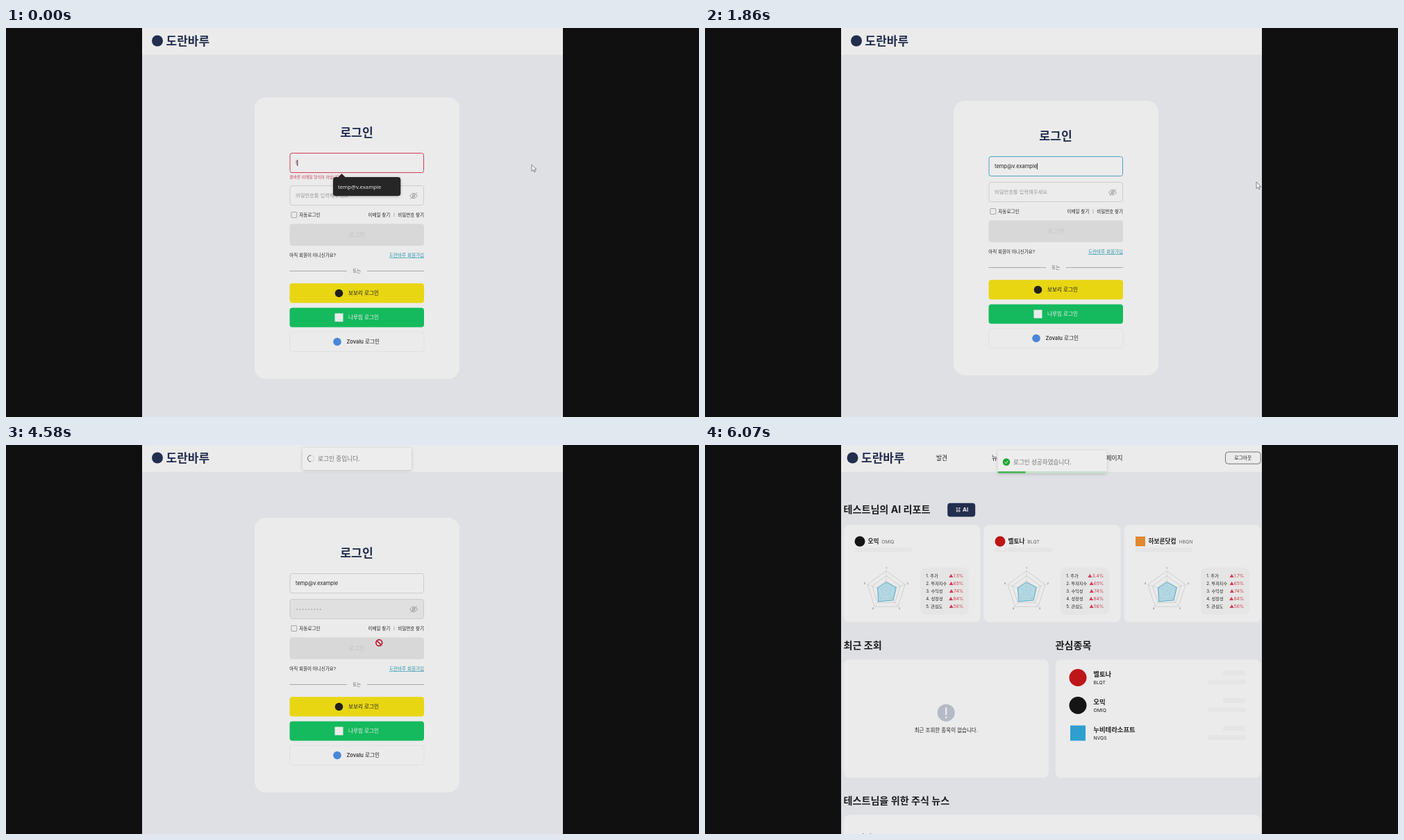
Write an HTML page that moves like this. It is 998x561 px and loops after 6.14 s.

```html
<!DOCTYPE html>
<html lang="ko">
<head>
<meta charset="utf-8">
<style>
html, body { margin: 0; width: 100%; height: 100%; overflow: hidden; background: #101010; }
svg { display: block; width: 998px; height: 561px; }
text { font-family: Inter, 'Noto Sans CJK KR', 'Noto Sans CJK', sans-serif; white-space: pre; }
.sys { font-family: 'Noto Sans', 'Noto Sans CJK KR', 'Noto Sans CJK', sans-serif; }
</style>
</head>
<body>
<svg id="stage" viewBox="0 0 998 561" xmlns="http://www.w3.org/2000/svg"></svg>
<script>
const LOOP = 6140;
const NAVY = '#232e4f', PAPER = '#ebebeb', INK = '#232323', RED = '#cf3f58', BLUE = '#4aa5c4';
const BRAND = '도란바루', EMAIL = 'temp@v.example';

const attrs = o => Object.entries(o).map(([k, v]) => `${k}="${v}"`).join(' ');
const rect = (x, y, width, height, rx, fill, more = {}) =>
  `<rect ${attrs({ x, y, width, height, rx, fill, ...more })}/>`;
const circle = (cx, cy, r, fill, more = {}) => `<circle ${attrs({ cx, cy, r, fill, ...more })}/>`;
const line = (x1, y1, x2, y2, stroke, more = {}) => `<line ${attrs({ x1, y1, x2, y2, stroke, ...more })}/>`;
const path = (d, more) => `<path ${attrs({ d, fill: 'none', ...more })}/>`;
const text = (x, y, size, str, fill = INK, more = {}) =>
  `<text ${attrs({ x, y, 'font-size': size, fill, ...more })}>${str}</text>`;
const group = (id, ...parts) => `<g id="${id}">${parts.join('')}</g>`;
const bold = { 'font-weight': 700 }, medium = { 'font-weight': 500 };
const middle = { 'text-anchor': 'middle' }, end = { 'text-anchor': 'end' };
const shadow = { filter: 'url(#shadow)' };

const logo = x => circle(x + 9, 18.5, 8, NAVY) +
  text(x + 21.6, 24.5, 17, BRAND, NAVY, { 'font-weight': 900 });

// Login page, in its settled layout (no error line)
const socialButton = (y, fill, icon, x, label, color, border = 'none') =>
  rect(408.5, y, 193.5, 28.2, 4, fill, { stroke: border, 'stroke-width': .6 }) + icon +
  text(x, y + 17, 7.6, label, color, medium);

const eye = path('M581.5 237q5.5-7.5 11 0q-5.5 7.5-11 0zM582.5 241.5l9.5-9', { stroke: '#9c9c9c' }) +
  circle(587, 237, 1.8, 'none', { stroke: '#9c9c9c' });

const loginPage = group('login', logo(209),
  rect(358, 105, 295, 396, 16, PAPER, { id: 'card' }),
  group('upper',
    text(505, 161.5, 17.2, '로그인', NAVY, { ...bold, ...middle }),
    rect(409, 185.5, 192.5, 28, 3, '#ececec', { id: 'emailBox' }),
    text(417, 202.2, 7.5, '', INK, { id: 'email' }),
    text(408.5, 222, 5.7, '올바른 이메일 형식이 아닙니다.', '#c9405a', { id: 'error' })),
  group('lower',
    rect(409, 222.5, 192.5, 28, 3, '#ececec', { id: 'passBox' }),
    text(417, 239.3, 7.3, '비밀번호를 입력해주세요.', '#9a9a9a', { id: 'hint' }),
    '<g id="dots"></g>', eye,
    rect(410.8, 260.5, 8, 8, 1, 'none', { stroke: '#888', 'stroke-width': .7 }),
    text(422.3, 266.7, 6.6, '자동로그인'),
    text(521.5, 266.7, 6.5, '이메일 찾기'), line(559, 261.5, 559, 267.5, '#999', { 'stroke-width': .7 }),
    text(602, 266.7, 6.5, '비밀번호 찾기', INK, end),
    rect(408.5, 277.5, 193.5, 31.5, 4, NAVY, { id: 'submit' }),
    text(505.3, 296.4, 8.5, '로그인', '#fff', { id: 'submitText', ...middle, ...medium }),
    text(408.3, 325, 6.5, '아직 회원이 아니신가요?'),
    text(602, 325, 6.55, BRAND + ' 회원가입', '#2a93ad', { ...end, 'text-decoration': 'underline' }),
    line(408.5, 345.5, 491, 345.5, '#9a9a9a', { 'stroke-width': .8 }),
    line(520, 345.5, 602, 345.5, '#9a9a9a', { 'stroke-width': .8 }),
    text(505.2, 347.8, 6.5, '또는', '#666', middle),
    socialButton(363.3, '#e8d613', circle(479.5, 377.5, 5.8, '#1f1f1f'), 493, '보보리 로그인', INK),
    socialButton(398.4, '#14ba5d', rect(473.5, 406.5, 12, 12, 0, PAPER), 493, '나루빔 로그인', '#eee'),
    socialButton(433.3, PAPER, circle(477, 447.5, 5.8, '#4a86d8'), 490.5, 'Zovalu 로그인', INK, '#d9d9d9')),
  line(0, 0, 0, 9, INK, { id: 'caret', 'stroke-width': .9 }),
  group('popup',
    '<path d="M478 215.5l5.5-5.5l5.5 5.5z" fill="#262626"/>',
    rect(471, 215, 97.3, 27.3, 4, '#262626', shadow),
    text(478, 231.5, 7.7, EMAIL, '#e2e2e2', { class: 'sys' }),
    path('M551.5 226l5 5.5m0-5.5l-5 5.5', { id: 'popupClose', stroke: '#ddd', 'stroke-width': .8 })));

// Home page
const polar = (cx, cy, r, i, n) => {
  const a = (i / n - .25) * 2 * Math.PI;
  return [cx + r * Math.cos(a), cy + r * Math.sin(a)];
};
const pentagon = (cx, cy, radii) =>
  radii.map((r, i) => polar(cx, cy, r, i, 5).map(v => v.toFixed(2)).join()).join(' ');

const RADAR_Y = 210, RADAR_R = 28.5;
const METRICS = ['주가', '투자지수', '수익성', '성장성', '관심도'];
const SCORES = [65, 74, 84, 56];

const report = (i, name, ticker, color, price, square) => {
  const x = 199.5 + i * 202, cx = x + 61.5;
  const nameEnd = x + 35 + name.length * 8.1;
  let out = rect(x, 115.3, 197, 140.2, 8, PAPER) +
    (square ? rect(x + 16.5, 132, 14, 14, 0, color) : circle(x + 23.5, 139, 7.5, color)) +
    text(x + 35, 142, 8.7, name, INK, bold) + text(nameEnd + 3.5, 141.5, 6.8, ticker, '#666') +
    rect(x + 16.5, 148, 82, 6.5, 1, '#e5e5e5') +
    rect(x + 110.5, 176.5, 70, 68.5, 8, '#e5e5e5');
  for (const k of [.25, .5, .75, 1])
    out += `<polygon points="${pentagon(cx, RADAR_Y, Array(5).fill(RADAR_R * k))}" fill="none" stroke="#bcbcbc" stroke-width=".6"/>`;
  METRICS.forEach((label, n) => {
    const [ex, ey] = polar(cx, RADAR_Y, RADAR_R, n, 5), [lx, ly] = polar(cx, RADAR_Y, 32.3, n, 5);
    const y = 190.6 + n * 11;
    out += line(cx, RADAR_Y, ex, ey, '#c4c4c4', { 'stroke-width': .5 }) +
      text(lx, ly + 1.2, 4, n + 1, '#666', middle) +
      text(x + 118.7, y, 6.2, `${n + 1}. ${label}`) +
      text(x + 172.8, y, 6.6, `▲${n ? SCORES[n - 1] : price}%`, RED, end);
  });
  return out + `<polygon class="radar" data-cx="${cx}" fill="#8fcbe0" fill-opacity=".6" stroke="#3f9fbd" stroke-width=".8"/>`;
};

const stock = (i, name, ticker, color, square) => {
  const y = 335.5 + i * 40;
  return (square ? rect(526, y - 11, 22, 22, 0, color) : circle(537, y, 12.5, color)) +
    text(559.3, y - 1.5, 9.4, name, INK, bold) + text(559.5, y + 9.8, 6.8, ticker) +
    rect(746, y - 10.5, 32, 7, 1, '#e5e5e5') + rect(724, y + 3, 54, 7, 1, '#e5e5e5');
};
const heading = (x, y, str) => text(x, y, 14.1, str, '#1d1d1d', bold);

const homePage = group('home', logo(203.5),
  text(333, 21.6, 8.7, '발견'), text(413, 21.6, 8.7, '뉴스'), text(601.5, 21.6, 8.7, '마이페이지', INK, end),
  rect(749.5, 10, 50.7, 17.2, 4, 'none', { stroke: '#555', 'stroke-width': .8 }),
  text(774.8, 21, 6.8, '로그아웃', INK, middle),
  group('loader', rect(436, 259.5, 128, 128, 16, PAPER),
    ...Array.from({ length: 8 }, (_, i) => {
      const [a, b] = polar(500.5, 323.5, 14.2, i, 8), [c, d] = polar(500.5, 323.5, 22, i, 8);
      return line(a, b, c, d, NAVY, { class: 'bar', 'stroke-width': 4.2, 'stroke-linecap': 'round' });
    })),
  group('content',
    heading(199.5, 97.5, '테스트님의 AI 리포트'),
    rect(349.2, 83.7, 40, 19.7, 4, NAVY),
    path('M361.5 91h2m2 0h2.5m-6.5 4h6.5m-5-5v7m3-7v7', { stroke: '#ddd', 'stroke-width': .9 }),
    text(371, 96.4, 8, 'AI', '#eee', bold),
    report(0, '오믹', 'OMIQ', '#151515', '1.5'),
    report(1, '벨토나', 'BLQT', '#bd1518', '3.4'),
    report(2, '하보른닷컴', 'HBQN', '#e08a2c', '1.7', true),
    heading(199.5, 293.5, '최근 조회'), heading(504.5, 293.5, '관심종목'),
    rect(199.5, 309.5, 295.5, 170.3, 8, PAPER), rect(504.8, 309.5, 295.5, 170.3, 8, PAPER),
    circle(347.2, 386.2, 12.5, '#b4bac6'),
    line(347.2, 379.5, 347.2, 388.5, PAPER, { 'stroke-width': 2.4, 'stroke-linecap': 'round' }),
    circle(347.2, 392.8, 1.4, PAPER),
    text(347.3, 414, 7.5, '최근 조회한 종목이 없습니다.', INK, middle),
    stock(0, '벨토나', 'BLQT', '#bd1518'),
    stock(1, '오믹', 'OMIQ', '#151515'),
    stock(2, '누비테라소프트', 'NVQS', '#2f9fd0', true),
    heading(199.5, 517.6, '테스트님을 위한 주식 뉴스'),
    rect(199.5, 533.5, 600.8, 60, 8, PAPER),
    text(226, 568.4, 9, '뉴스', INK, bold)));

const toasts = group('pending',
    rect(427, 4, 157, 32, 3, '#ededed', shadow),
    circle(439, 19.5, 4.6, 'none', { stroke: '#cfcfcf' }),
    path('M439 14.9a4.6 4.6 0 0 0 0 9.2', { stroke: '#6a6a6a' }),
    text(449, 23, 8.7, '로그인 중입니다.', '#757575', { class: 'sys' })) +
  group('success',
    rect(421.5, 8, 157, 33, 3, '#ededed', shadow),
    rect(421.5, 38, 157, 2.8, 1, '#c6dfca'), rect(421.5, 38, 157, 2.8, 1, '#4fb35a', { id: 'progress' }),
    circle(434, 24.5, 5.2, '#1fa52f'),
    path('M431.5 24.7l1.8 1.8l3.3-3.8', { stroke: '#fff' }),
    text(444, 27.9, 8.6, '로그인 성공하였습니다.', '#757575', { class: 'sys' }));

const pointers = group('arrow', path('M0 0V9.5L2.3 7.5L3.8 10.8L5.3 10.2L3.9 7H7Z',
    { fill: '#f4f4f4', stroke: '#444', 'stroke-width': .6 })) +
  group('blocked', circle(537.3, 285.3, 4.4, '#eee', { stroke: '#b3162c', 'stroke-width': 1.7 }),
    line(534.3, 282.3, 540.3, 288.3, '#b3162c', { 'stroke-width': 1.7 }));

const stage = document.getElementById('stage');
stage.innerHTML = `<defs><filter id="shadow" x="-10%" y="-30%" width="120%" height="170%">
  <feDropShadow dx="0" dy="1" stdDeviation="2" flood-opacity=".18"/></filter></defs>` +
  rect(0, 0, 998, 561, 0, '#101010') + rect(196, 0, 606, 561, 0, '#dfe0e4') +
  rect(196, 0, 606, 38.7, 0, PAPER) + loginPage + homePage + toasts +
  rect(802, 0, 196, 561, 0, '#101010') + pointers;

const el = Object.fromEntries([...stage.querySelectorAll('[id]')].map(n => [n.id, n]));
const bars = [...stage.querySelectorAll('.bar')], radars = [...stage.querySelectorAll('.radar')];
const set = (node, o) => { for (const k in o) node.setAttribute(k, o[k]); };
const show = (node, on) => { node.style.display = on ? '' : 'none'; };

// The screen refreshes in bursts: [first, interval, count]
const ticks = [[0, 70, 3], [270, 70, 2], [680, 70, 16], [1860, 70, 5], [2340, 70, 2], [2610, 0, 1],
  [2880, 130, 4], [3340, 0, 1], [3670, 130, 8], [4780, 130, 2], [5110, 130, 2], [5440, 70, 10]]
  .flatMap(([first, step, n]) => Array.from({ length: n }, (_, i) => first + i * step));

const keyPresses = [2340, 2410, 2610, 2880, 3010, 3140, 3270, 3340, 3340];
const mousePath = [[0, 757, 197], [70, 776, 330], [140, 788, 393], [340, 794, 222], [3340, 794, 222],
  [3670, 735, 250], [3800, 590, 292], [3930, 540, 282], [4060, 537, 285], [4780, 537, 285],
  [4910, 562, 245], [5110, 650, 95], [5240, 677, -4], [LOOP, 677, -40]];

function mouseAt(t) {
  const i = Math.max(1, mousePath.findIndex(p => p[0] >= t));
  const [t0, x0, y0] = mousePath[i - 1], [t1, x1, y1] = mousePath[i];
  const k = (t - t0) / (t1 - t0);
  return [x0 + (x1 - x0) * k, y0 + (y1 - y0) * k];
}

// cubic-bezier(.25, .1, .25, 1)
function ease(x) {
  const curve = (a, b, s) => 3 * a * s * (1 - s) ** 2 + 3 * b * s * s * (1 - s) + s ** 3;
  let lo = 0, hi = 1;
  for (let i = 0; i < 20; i++) {
    const mid = (lo + hi) / 2;
    if (curve(.25, .25, mid) < x) lo = mid; else hi = mid;
  }
  return curve(.1, 1, lo);
}

function drawLogin(t) {
  const filled = t >= 680, valid = t >= 1240, onPassword = t >= 1930, busy = t >= 4320;
  const shift = valid ? 0 : 5;
  const typed = keyPresses.filter(k => k <= t).length;
  const active = typed > 0 && !busy;
  const passFocus = onPassword && !busy;

  set(el.card, { y: 105 - shift, height: 396 + 2 * shift });
  set(el.upper, { transform: `translate(0 ${-shift})` });
  set(el.lower, { transform: `translate(0 ${shift})` });
  show(el.error, !valid);
  el.email.textContent = filled ? EMAIL : 't';
  set(el.email, { fill: filled ? INK : '#b04458' });
  set(el.emailBox, { stroke: !valid ? RED : onPassword ? '#c4c4c4' : BLUE,
    'stroke-width': onPassword ? .8 : 1 });
  set(el.passBox, { stroke: passFocus ? BLUE : '#c4c4c4', 'stroke-width': passFocus ? 1 : .8,
    fill: busy ? '#e0e0e0' : '#ececec' });
  show(el.hint, !typed);
  el.dots.innerHTML = Array.from({ length: typed }, (_, i) =>
    circle(419 + i * 4.25, 237, .95, busy ? '#aaa' : INK)).join('');
  set(el.submit, { fill: active ? NAVY : '#d8d8d8' });
  set(el.submitText, { fill: active ? '#f0f0f0' : '#c3c3c3' });

  const caretX = onPassword ? 417 + typed * 4.25 : 417.3 + el.email.getComputedTextLength();
  const caretY = onPassword ? 232.3 : 195 - shift;
  set(el.caret, { transform: `translate(${caretX} ${caretY})` });
  show(el.caret, t < 3800);

  const fade = Math.min(1, Math.max(0, (1520 - t) / 180));
  show(el.popup, fade > 0);
  show(el.popupClose, filled);
  const scale = .965 + .035 * fade;
  set(el.popup, { opacity: fade < 1 ? fade + .25 : 1,
    transform: `translate(519.6 228.6) scale(${scale}) translate(-519.6 -228.6)` });
}

function drawHome(t) {
  const ready = t >= 5440;
  show(el.loader, !ready);
  show(el.content, ready);
  const lead = Math.round((t - 5240) / 125) + 6;
  bars.forEach((bar, i) => {
    const age = ((lead - i) % 8 + 8) % 8;
    bar.setAttribute('stroke', [NAVY, '#596281', '#8a93aa', '#a3acbe'][age] || '#b2bac8');
  });
  const grow = ease(Math.min(1, Math.max(0, t - 5300) / 1500));
  const radii = [52, ...SCORES].map(v => v / 100 * RADAR_R * grow);
  for (const r of radars) r.setAttribute('points', pentagon(+r.dataset.cx, RADAR_Y, radii));
  set(el.progress, { width: 157 * (.71 - (t - 5240) * .000546) });
}

function draw(time) {
  const t = ticks.filter(k => k <= time).pop();
  const home = t >= 4780;
  show(el.login, !home);
  show(el.home, home);
  show(el.success, home);
  show(el.pending, t >= 4450 && !home);
  set(el.pending, { transform: `translate(0 ${t < 4580 ? -17 : 0})` });
  if (home) drawHome(t); else drawLogin(t);

  const blocked = t >= 4320 && !home;
  show(el.blocked, blocked);
  show(el.arrow, !blocked && t < 5440);
  set(el.arrow, { transform: `translate(${mouseAt(t)})` });
}

const start = performance.now();
function tick() {
  draw((performance.now() - start) % LOOP);
  requestAnimationFrame(tick);
}
tick();
</script>
</body>
</html>
```
